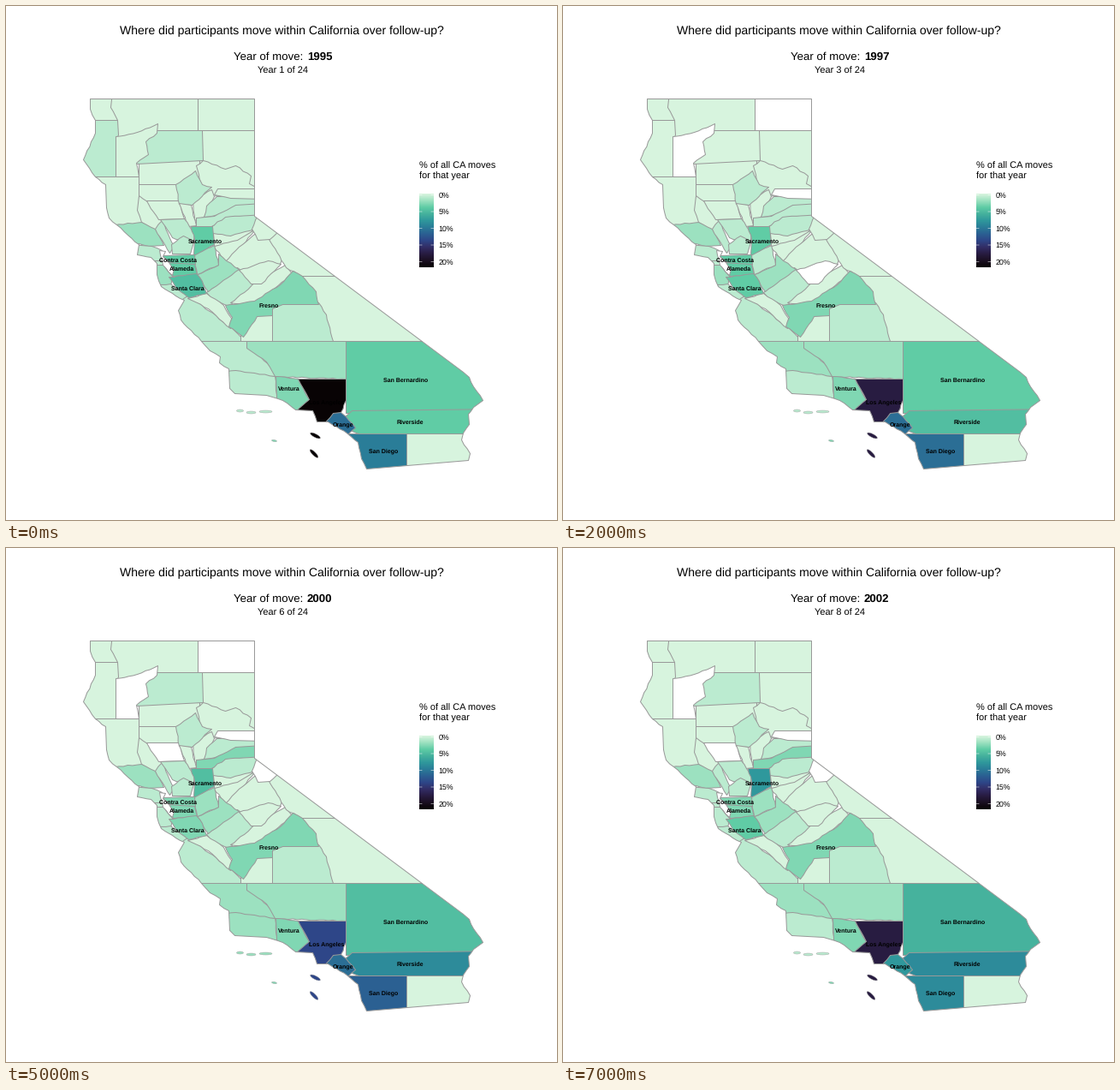
Recreate the animation shown at these times as a matplotlib script. Size 644 px wide and 600 px high, loop 8 s.

```python
import numpy as np
import matplotlib.pyplot as plt
from matplotlib.animation import FuncAnimation
from matplotlib.colors import LinearSegmentedColormap
from matplotlib.patches import Ellipse, Polygon

W, H, DPI = 644, 600, 100
PX = 72 / DPI
TOP = 22
FIRST, YEARS, TOTAL = 1995, 8, 24
NO = -1  # no moves recorded that year
GREY = "#999999"

ramp = LinearSegmentedColormap.from_list("moves", [
    "#d7f4de", "#9ce1c0", "#5fcca5", "#45b19d", "#2f989c", "#2a7d98",
    "#2b6092", "#2e4688", "#322e66", "#281c42", "#1b1022", "#080304"])
rng = np.random.default_rng(4)

plt.rcParams.update({"font.family": "Liberation Sans",
                     "text.hinting": "none", "path.snap": False})
fig = plt.figure(figsize=(W / DPI, H / DPI), dpi=DPI, facecolor="white")
ax = fig.add_axes([0, 0, 1, 1])
ax.axis("off")


def rough(points, amp=0.7, step=5):
    """Break slanted edges into small seeded wiggles."""
    out = []
    for a, b in zip(points[:-1], points[1:]):
        d = b - a
        length = np.hypot(*d)
        n = 1 if min(abs(d)) < 2.5 else max(1, int(length / step))
        t = np.arange(n)[:, None] / n
        normal = np.array([-d[1], d[0]]) / length
        sway = rng.uniform(-amp, amp, (n, 1)) * (t > 0)
        out.append(a + t * d + sway * normal)
    return np.vstack(out + [points[-1:]])


def pairs(*xy):
    return np.reshape(xy, (-1, 2)).astype(float)


coast = rough(pairs(
    98, 108, 98, 120, 104, 133, 104, 148, 90, 179, 104, 199, 116, 208,
    117, 235, 120, 247, 129, 255, 142, 267, 155, 278, 153, 290, 169, 293,
    176, 300, 176, 313, 181, 327, 198, 338, 208, 343, 201, 355, 204, 366,
    228, 391, 238, 402, 250, 409, 249, 416, 260, 423, 261, 446, 267, 452,
    304, 454, 323, 460, 338, 471, 358, 472, 363, 485, 376, 485, 399, 499,
    411, 509, 415, 528, 421, 540))
river = rough(pairs(
    540, 530, 542, 522, 532, 506, 534, 498, 541, 488, 540, 476, 546, 468,
    557, 460, 546, 444, 541, 433, 534, 427))
lake_corner = pairs(290, 245, 290, 108)
state = Polygon(np.vstack([coast, river, lake_corner]), fc="none", ec=GREY,
                lw=PX, joinstyle="round", zorder=3)
ax.add_patch(state)

areas = []


def track(patch, pct, changes):
    """Remember the yearly share: a usual value and the years that differ."""
    ax.add_patch(patch)
    areas.append((patch, pct, changes or {}))


def county(name, pct, *xy, changes=None):
    """Add one county; later ones cover the loose edges of earlier ones."""
    points = pairs(*xy)
    patch = Polygon(rough(np.vstack([points, points[:1]])), ec=GREY, lw=PX,
                    joinstyle="round", zorder=2, label=name)
    track(patch, pct, changes)
    patch.set_clip_path(state)


def box(name, pct, x0, y0, x1, y1, changes=None):
    county(name, pct, x0, y0, x1, y0, x1, y1, x0, y1, changes=changes)


def island(x, y, w, h, turn, pct, changes=None):
    track(Ellipse((x, y), w, h, angle=turn, ec=GREY, lw=0.4 * PX, zorder=2),
          pct, changes)


def text(x, y, s, size, ha="center", weight="normal"):
    """Place text with its capitals centred on y; size in pixels."""
    return ax.text(x, y + 0.36 * size, s, fontsize=size * PX, ha=ha,
                   va="baseline", weight=weight, color="black", zorder=5)


# North
box("Siskiyou", 0, 80, 100, 230, 170)
county("Del Norte", 0, 80, 100, 124, 100, 122, 118, 130, 133, 80, 133)
box("Mendocino", 0, 80, 199, 170, 270)
county("Humboldt", 1, 80, 133, 130, 133, 131, 150, 128, 158, 128, 199,
       80, 199, changes={1997: 0, 2000: 0, 2002: 0})
box("Lassen", 0, 226, 145, 300, 220)
box("Tehama", 0, 155, 180, 226, 212)
county("Shasta", 1, 165, 145, 229, 145, 230, 180, 190, 182, 152, 184,
       150, 165, changes={1997: 0})
county("Trinity", 0, 128, 199, 128, 152, 153, 147, 177, 137, 176, 148,
       163, 158, 166, 173, 152, 183, 155, 199,
       changes=dict.fromkeys((1997, 1999, 2000, 2002), NO))
box("Modoc", 0, 224, 100, 300, 145,
    changes=dict.fromkeys(range(1996, 2001), NO))
county("Plumas", 0, 222, 186, 230, 180, 256, 190, 268, 186, 286, 198,
       284, 207, 300, 216, 240, 222, 228, 212)
county("Yuba", 0, 217, 226, 240, 214, 243, 222, 231, 246, 220, 250)
county("Nevada", 1, 231, 246, 234, 233, 246, 222, 300, 222, 300, 234,
       262, 240)
county("Sierra", 0, 243, 220, 247, 213, 300, 213, 300, 225, 262, 224,
       changes=dict.fromkeys(range(1997, 2003), NO))
box("Glenn", 0, 155, 208, 206, 232)
county("Lake", 0, 155, 221, 165, 228, 180, 235, 186, 258, 174, 264,
       158, 252, 153, 238)
county("Colusa", 0, 164, 227, 202, 227, 208, 248, 178, 249, 172, 240,
       changes={2000: NO, 2002: NO})
county("Butte", 1, 198, 208, 221, 192, 229, 208, 240, 211, 217, 232, 202, 231)
county("Sutter", 0, 202, 230, 216, 232, 222, 256, 213, 257)
county("Placer", 1, 222, 257, 222, 247, 243, 245, 268, 232, 300, 230,
       300, 246, 266, 245, 240, 257, changes={1999: 2, 2000: 3, 2001: 2, 2002: 3})
county("El Dorado", 1, 238, 258, 256, 246, 300, 243, 300, 256, 280, 268,
       242, 270)

# Foothills and valley
county("Calaveras", 0, 242, 280, 290, 262, 258, 300)
county("Tuolumne", 0, 256, 298, 268, 285, 290, 266, 330, 280, 318, 304,
       262, 310)
county("Amador", 0, 242, 265, 262, 268, 290, 260, 270, 273, 243, 280)
county("Merced", 1, 234, 334, 270, 305, 292, 324, 260, 350, 243, 343)
county("Madera", 0, 262, 346, 278, 334, 296, 318, 326, 302, 334, 312,
       290, 350)
county("Mono", 0, 296, 245, 400, 245, 400, 315, 345, 315, 327, 305, 306, 270)
county("Alpine", 0, 287, 260, 296, 240, 320, 262, 308, 272, 294, 273,
       changes=dict.fromkeys(range(1999, 2003), NO))
county("Mariposa", 0, 272, 308, 306, 297, 321, 301, 298, 324, 286, 324,
       changes={1997: NO})
county("Stanislaus", 2, 223, 313, 248, 302, 248, 289, 257, 297, 272, 307,
       236, 333)
county("San Joaquin", 2, 219, 290, 243, 279, 248, 302, 223, 313,
       changes=dict.fromkeys(range(1996, 2000), 1))

# Bay area
county("Sonoma", 2, 110, 257, 158, 252, 174, 260, 184, 279, 166, 280,
       155, 277, 110, 285)
county("Napa", 1, 174, 260, 182, 250, 196, 280, 191, 288, 180, 270)
county("Yolo", 1, 180, 249, 208, 248, 220, 266, 218, 278, 194, 270)
county("Solano", 1, 193, 278, 207, 268, 219, 275, 215, 289, 194, 289)
county("Sacramento", 4, 216, 257, 241, 257, 243, 278, 219, 291, 220, 272,
       changes={1998: 5, 1999: 5, 2000: 5, 2002: 8})
county("Marin", 1, 145, 278, 170, 280, 182, 285, 182, 298, 145, 300)
box("San Francisco", 1, 165, 297, 184, 302)
county("Contra Costa", 3, 181, 291, 220, 290, 221, 301, 200, 303, 190, 298,
       changes=dict.fromkeys(range(1995, 1998), 4))
county("Alameda", 3, 186, 299, 220, 301, 223, 313, 195, 315,
       changes=dict.fromkeys(range(1995, 1999), 4))
county("San Mateo", 2, 165, 302, 184, 302, 195, 316, 192, 327, 165, 327,
       changes=dict.fromkeys(range(2000, 2003), 1))
county("Monterey", 1, 190, 330, 216, 340, 262, 374, 279, 391, 190, 391)
county("Santa Cruz", 1, 170, 327, 192, 324, 212, 338, 204, 344, 190, 345)
county("San Benito", 0, 212, 341, 234, 335, 254, 349, 263, 364, 262, 376,
       236, 353)
county("Santa Clara", 4, 190, 316, 222, 312, 229, 321, 234, 335, 213, 340,
       198, 328, changes={1995: 5, 1996: 5, 2000: 3, 2001: 2})
county("Bay", NO, 179, 285, 186, 286, 183, 292, 190, 299, 196, 307,
       194, 314, 183, 302)

# South
county("Inyo", 0, 345, 315, 500, 315, 500, 391, 380, 391, 360, 340)
box("Kings", 0, 274, 360, 315, 391)
county("Tulare", 1, 311, 346, 365, 346, 374, 360, 382, 391, 311, 391,
       changes={2001: 2})
county("Fresno", 3, 256, 349, 290, 344, 320, 325, 335, 309, 346, 315,
       362, 333, 365, 348, 323, 348, 311, 353, 311, 361, 293, 362, 277, 386,
       260, 374, 264, 363, changes={2001: 4})
county("San Luis Obispo", 2, 220, 391, 281, 391, 318, 432, 240, 431,
       changes={1995: 1, 1996: 1})
box("San Bernardino", 4, 397, 391, 580, 475, changes={2000: 5, 2002: 6})
county("Kern", 2, 281, 391, 397, 391, 397, 435, 314, 432, 304, 415, 294, 408,
       281, 399, changes={2001: 3})
shore = {2000: 2, 2001: 2}
county("Santa Barbara", 1, 240, 429, 268, 425, 290, 428, 314, 432, 317, 470,
       240, 470, changes=shore)
county("Ventura", 3, 315, 432, 341, 435, 354, 459, 340, 480, 320, 480,
       316, 456, changes={2001: 4})
county("Riverside", 9, 396, 479, 404, 472, 580, 470, 580, 499, 412, 499,
       402, 495, changes={1995: 4, 1996: 4, 1997: 5, 1998: 6, 1999: 6, 2001: 8})
box("Imperial", 0, 468, 499, 580, 560)
box("San Diego", 11, 390, 499, 468, 560,
    changes={1995: 10, 1996: 10, 2000: 12, 2001: 12, 2002: 9})
basin = {1995: 22, 1996: 22, 1997: 18, 2000: 14, 2001: 17, 2002: 18}
county("Los Angeles", 19, 341, 435, 397, 435, 397, 460, 391, 474, 376, 485,
       370, 500, 330, 480, 354, 459, 347, 446, changes=basin)
county("Orange", 11, 382, 475, 391, 474, 397, 479, 408, 492, 399, 500,
       390, 510, 370, 490, changes={1999: 10, 2001: 12, 2002: 8})

for x, y, w in [(273, 472, 8), (286, 474, 11), (303, 473, 15)]:
    island(x, y, w, 3, 0, 1, shore)
island(313, 507, 6, 2, 10, 3, {2001: 4})
island(361, 501, 13, 4, 27, 19, basin)
island(359.5, 522, 13, 4, 45, 19, basin)

for name, x, y in [
        ("Sacramento", 232, 274), ("Contra Costa", 200, 295.5),
        ("Alameda", 205, 306), ("Santa Clara", 211.5, 328.5),
        ("Fresno", 306.5, 348.5), ("Ventura", 330, 445.5),
        ("San Bernardino", 467, 435.5), ("Los Angeles", 374, 461.5),
        ("Orange", 393, 488), ("Riverside", 471.5, 485),
        ("San Diego", 440.5, 518)]:
    text(x, y, name, 7, weight="bold")

# Legend
ax.imshow(np.linspace(0, 1, 256)[:, None], cmap=ramp, aspect="auto",
          extent=(482.5, 499.5, 304.5, 219), zorder=2)
text(483, 185.5, "% of all CA moves", 11, "left")
text(483, 197.5, "for that year", 11, "left")
for pct in range(0, 21, 5):
    y = 220 + 3.9 * pct
    text(505, y, f"{pct}%", 8.8, "left")
    ax.hlines([y, y], [482.5, 496.1], [485.9, 499.5], color="white",
              lw=0.5 * PX, zorder=3)

# Headings
text(321.5, 28, "Where did participants move within California over follow-up?",
     14)
text(265.5, 58, "Year of move: ", 13.2, "left")
year_text = text(351.2, 58, "", 13.2, "left", "bold")
count_text = text(323, 74.5, "", 11)

# Whole coordinates fall on pixel centres
ax.set_xlim(-0.5, W - 0.5)
ax.set_ylim(H - 0.5, -0.5)


def draw(i):
    year = FIRST + i
    year_text.set_text(str(year))
    count_text.set_text(f"Year {i + 1} of {TOTAL}")
    for patch, usual, changes in areas:
        pct = changes.get(year, usual)
        patch.set_facecolor("white" if pct == NO else ramp(pct / TOP))
    return []


anim = FuncAnimation(fig, draw, frames=YEARS, interval=1000, repeat=True,
                     repeat_delay=0)
plt.show()
```
